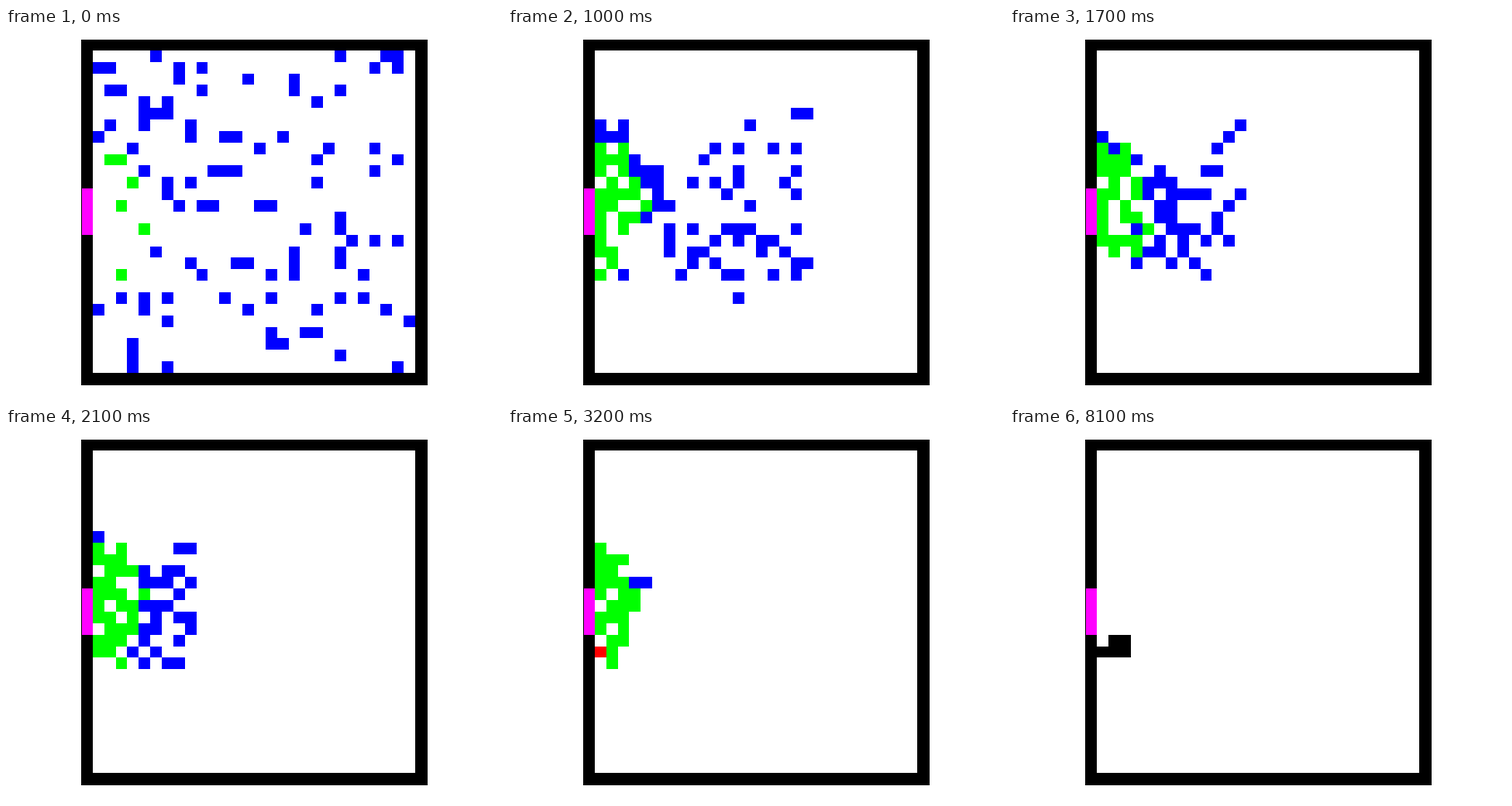
A matplotlib script that plays this animation: 640 by 480 pixels, repeating every 8200 ms.

```python
import math
import random

import numpy as np
import matplotlib.pyplot as plt
from matplotlib.animation import FuncAnimation

W, H, DPI = 640, 480, 100
CELLS, STEPS = 30, 40
FRAMES, INTERVAL = 82, 100

WHITE, BLACK = (255, 255, 255), (0, 0, 0)
BLUE, GREEN = (0, 0, 255), (0, 255, 0)
RED, MAGENTA = (255, 0, 0), (255, 0, 255)

EDGE_X = np.floor(97.4 + 14.867 * np.arange(CELLS + 1)).astype(int)
EDGE_Y = np.floor(14.4 + 14.867 * np.arange(CELLS + 1)).astype(int)

DOOR_TOP, DOOR_BOTTOM = 13, 16
NEAR = 5          # radius in which people turn green
PULL = 5          # how strongly people prefer the shortest way

# Starting places: row -> columns
START = {
    1: (6, 22, 26, 27), 2: (1, 2, 8, 10, 25, 27), 3: (8, 14, 18),
    4: (2, 3, 10, 18, 22), 5: (5, 7, 20), 6: (5, 6, 7), 7: (2, 5, 9),
    8: (1, 9, 12, 13, 17), 9: (4, 15, 21, 25), 10: (2, 3, 20, 27),
    11: (5, 11, 12, 13, 25), 12: (4, 7, 9, 20), 13: (7,),
    14: (3, 8, 10, 11, 15, 16), 15: (22,), 16: (5, 19, 22),
    17: (23, 25, 27), 18: (6, 18, 22), 19: (9, 13, 14, 18, 22),
    20: (3, 10, 16, 18, 24), 22: (3, 5, 7, 12, 16, 22, 24),
    23: (1, 5, 14, 20, 26), 24: (7, 28), 25: (16, 19, 20),
    26: (4, 16, 17), 27: (4, 22), 28: (4, 7, 27),
}

# People still inside at a few steps
INSIDE_AT = (0, 5, 9, 16, 25, 40)
INSIDE = (101, 94, 85, 66, 43, 3)

# Someone falls: step, cell, colour
FALLS = ((30, (1, 18), RED), (32, (2, 18), MAGENTA), (37, (2, 17), RED))
BODIES = ((1, 18), (2, 17), (2, 18), (3, 17), (3, 18))


def gap(cell):
    """Distance from a cell to the nearest door cell."""
    col, row = cell
    return math.hypot(col, max(DOOR_TOP - row, 0, row - DOOR_BOTTOM))


def shade(cell):
    return GREEN if gap(cell) <= NEAR else BLUE


def choose(cell, taken, rng):
    """Pick a free neighbour (or stay), favouring cells closer to the door."""
    col, row = cell
    options = [cell]
    for dc in (-1, 0, 1):
        for dr in (-1, 0, 1):
            spot = (col + dc, row + dr)
            inside = all(0 < v < CELLS - 1 for v in spot)
            if inside and spot not in taken:
                options.append(spot)
    weights = [math.exp(PULL * (gap(cell) - gap(s))) for s in options]
    return rng.choices(options, weights)[0]


def simulate(seed=4):
    """Return one {cell: colour} dict per step."""
    rng = random.Random(seed)
    walkers = {(c, r): shade((c, r)) for r, cols in START.items() for c in cols}
    fallen = {}
    states = [dict(walkers)]
    for step in range(1, STEPS + 1):
        surplus = len(walkers) + len(fallen) - round(np.interp(step, INSIDE_AT, INSIDE))
        ready = sorted((c for c in walkers if gap(c) < 1.5), key=gap)
        for cell in ready[:max(surplus, 0)]:
            del walkers[cell]

        # Everybody moves at once; the first to claim a cell gets it
        taken = set(walkers) | set(fallen)
        order = sorted(walkers)
        rng.shuffle(order)
        moved = {}
        for cell in order:
            spot = choose(cell, taken, rng)
            if spot in moved:
                spot = cell
            moved[spot] = shade(cell)
        walkers = moved

        for when, spot, colour in FALLS:
            if when == step:
                if walkers:
                    del walkers[min(walkers, key=lambda c: math.dist(c, spot))]
                fallen[spot] = colour
        if step == STEPS:
            walkers = {}
        states.append({**walkers, **fallen})
    return states


def fill(img, cell, colour):
    col, row = cell
    img[EDGE_Y[row]:EDGE_Y[row + 1], EDGE_X[col]:EDGE_X[col + 1]] = colour


def make_room():
    img = np.full((H, W, 3), WHITE, dtype=np.uint8)
    img[15:461, 97:544] = BLACK
    img[EDGE_Y[1]:EDGE_Y[-2], EDGE_X[1]:EDGE_X[-2]] = WHITE
    for row in range(DOOR_TOP, DOOR_BOTTOM + 1):
        fill(img, (0, row), MAGENTA)
    img[15:461, 97] = BLACK
    return img


ROOM = make_room()
STATES = simulate()

fig = plt.figure(figsize=(W / DPI, H / DPI), dpi=DPI, facecolor="white")
ax = fig.add_axes([0, 0, 1, 1])
ax.axis("off")
picture = ax.imshow(ROOM, interpolation="nearest", aspect="auto")


def update(i):
    if i == FRAMES - 1:
        people = dict.fromkeys(BODIES, BLACK)
    else:
        people = STATES[min(max(i - 1, 0), STEPS)]
    img = ROOM.copy()
    for cell, colour in people.items():
        fill(img, cell, colour)
    picture.set_data(img)
    return (picture,)


anim = FuncAnimation(fig, update, frames=FRAMES, interval=INTERVAL,
                     repeat=True, repeat_delay=0, blit=False)
plt.show()
```
